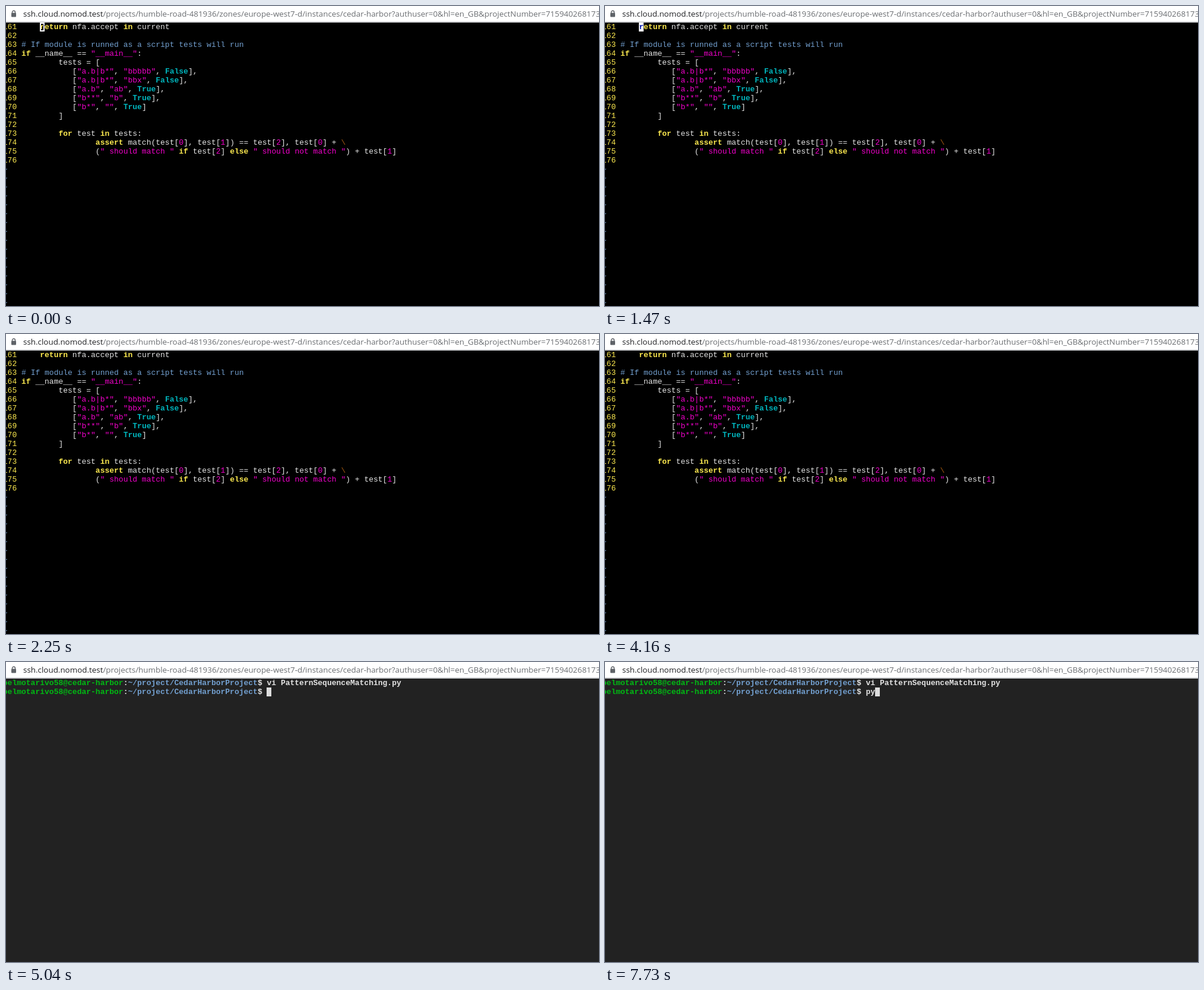
These frames come from a looping animation (999 by 506 pixels, 8 s). An HTML page:

```html
<!DOCTYPE html>
<html lang="en">
<head>
<meta charset="utf-8">
<title>Terminal session</title>
<style>
  html, body { margin: 0; width: 100%; height: 100%; overflow: hidden; background: #000; }
  #stage { position: relative; width: 999px; height: 506px; overflow: hidden; background: #000; }
  #stage > * { position: absolute; }
  #bar {
    left: 0; top: 0; width: 999px; height: 26px; overflow: hidden;
    background: #fff; border-bottom: 2px solid #cfd1d4;
    font: 13.4px/26px "Open Sans", sans-serif; color: #6b6e72; white-space: pre;
  }
  #bar span { position: absolute; left: 29px; top: 0; }
  #bar b { font-weight: 400; color: #202124; }
  #bar svg { position: absolute; left: 8px; top: 7px; }
  pre {
    left: -5.2px; top: 28px; margin: 0;
    font: 13px/15px "Liberation Mono", monospace; color: #e4e4e4;
  }
  .num, .key { color: #fce94f; }
  .str, .int { color: #f200cb; }
  .bool { color: #00b5bd; }
  .key, .bool, #shell { font-weight: 700; }
  .note, .path { color: #729fcf; }
  .esc { color: #a85a10; }
  .user { color: #00ba13; }
  #caret {
    width: 8px; height: 15px; box-sizing: border-box;
    border: 2px solid #fff; mix-blend-mode: difference;
  }
  #mouse { left: 0; top: 0; }
</style>
</head>
<body>
<div id="stage">
  <pre id="editor"></pre>
  <pre id="shell"></pre>
  <div id="caret"></div>
  <svg id="mouse" width="7" height="16" fill="none" stroke="#fff">
    <path d="M0 .5H3M4 .5H7M3.5 1V15M0 15.5H3M4 15.5H7"/>
  </svg>
  <div id="bar">
    <svg width="10" height="12">
      <path d="M2.5 5V3.5a2.5 2.5 0 0 1 5 0V5" fill="none" stroke="#5f6368" stroke-width="1.4"/>
      <rect x="1" y="4.5" width="8" height="7" rx="1" fill="#5f6368"/>
    </svg>
    <span><b>ssh.cloud.nomod.test</b>/projects/humble-road-481936/zones/europe-west7-d/instances/cedar-harbor?authuser=0&amp;hl=en_GB&amp;projectNumber=715940268173</span>
  </div>
</div>
<script>
const LOOP = 8000, CELL = 7.8, LEFT = -5.2, PROMPT_COLS = 57;
const $ = id => document.getElementById(id);
const stage = $('stage'), editor = $('editor'), shell = $('shell');
const caret = $('caret'), mouse = $('mouse');

const code = String.raw`    return nfa.accept in current

# If module is runned as a script tests will run
if __name__ == "__main__":
        tests = [
           ["a.b|b*", "bbbbb", False],
           ["a.b|b*", "bbx", False],
           ["a.b", "ab", True],
           ["b**", "b", True],
           ["b*", "", True]
        ]

        for test in tests:
                assert match(test[0], test[1]) == test[2], test[0] + \
                (" should match " if test[2] else " should not match ") + test[1]
`.split('\n');

const span = (kind, text) => `<span class="${kind}">${text}</span>`;
const token = /(?<note>#.*)|(?<str>"[^"]*")|(?<bool>\b(?:True|False)\b)|(?<key>\b(?:return|in|if|else|for|assert)\b)|(?<int>\b\d\b)|(?<esc>\\$)/g;

function highlight(line) {
  return line.replace(token, (text, ...rest) => {
    const groups = rest[rest.length - 1];
    return span(Object.keys(groups).find(k => groups[k] !== undefined), text);
  });
}

editor.innerHTML = code.map((line, i) => span('num', 161 + i) + ' ' + highlight(line))
  .concat(Array(16).fill(span('path', '~'))).join('\n');

const prompt = span('user', 'pelmotarivo58@cedar-harbor') + ':' +
  span('path', '~/project/CedarHarborProject') + '$ ';
const history = prompt + 'vi PatternSequenceMatching.py\n' + prompt;
let shown = null;

function drawShell(t) {
  const typed = t < 7080 ? '' : t < 7730 ? 'p' : 'py';
  if (typed !== shown) shell.innerHTML = history + (shown = typed);
  return PROMPT_COLS + typed.length;
}

// The pointer glides in over ten steps, then rests until it hides.
function drawMouse(t) {
  mouse.style.display = t >= 160 && t < 1470 ? '' : 'none';
  const p = Math.min(1, Math.max(0, Math.floor((t - 160) / 47) / 10));
  const left = (1 - p) ** 2;
  mouse.style.transform = `translate(${Math.round(811 + 82 * left)}px, ${Math.round(333 + 136 * left)}px)`;
}

function draw(t) {
  const inShell = t >= 5040;
  const blinkOff = (t >= 2250 && t < 2900) || (t >= 4160 && t < 5040);
  const col = inShell ? drawShell(t) : 8;
  stage.style.background = inShell ? '#222' : '#000';
  editor.style.display = inShell ? 'none' : '';
  shell.style.display = inShell ? '' : 'none';
  caret.style.display = blinkOff ? 'none' : '';
  caret.style.left = Math.round(LEFT + CELL * col) + 'px';
  caret.style.top = (inShell ? 43 : 28) + 'px';
  caret.style.background = t < 630 ? 'none' : '#fff';
  drawMouse(t);
}

let start;
function tick(now) {
  start ??= now;
  draw((now - start) % LOOP);
  requestAnimationFrame(tick);
}
draw(0);
requestAnimationFrame(tick);
</script>
</body>
</html>
```
